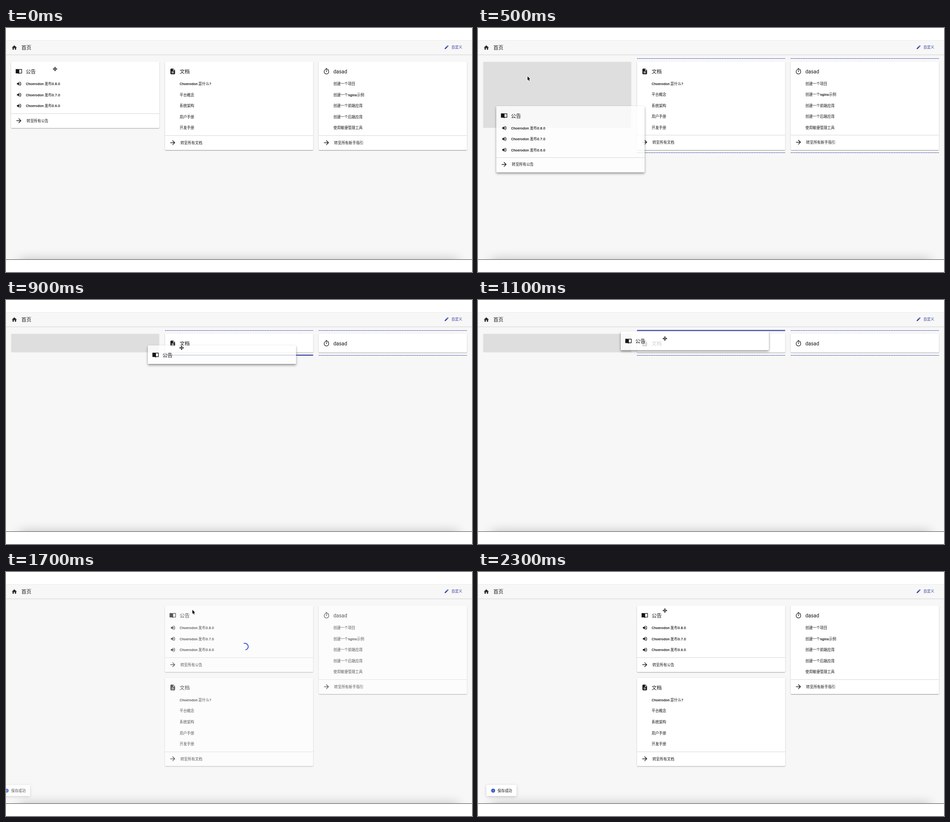
Write an HTML page with a canvas that moves like this. It is 950 by 500 pixels and loops after 2400 ms.

```html
<!DOCTYPE html>
<html lang="zh-CN">
<head>
<meta charset="utf-8">
<style>
html, body { margin: 0; width: 950px; height: 500px; overflow: hidden; background: #fff; }
canvas { display: block; width: 950px; height: 500px; }
</style>
</head>
<body>
<canvas id="stage"></canvas>
<script>
const stage = document.getElementById('stage');
const ctx = stage.getContext('2d');
const dpr = window.devicePixelRatio || 1;
stage.width = 950 * dpr;
stage.height = 500 * dpr;

const FONT = 'Roboto, "Noto Sans CJK SC", "Noto Sans CJK", sans-serif';
const INK = '#141414', NAVY = '#303f9f';
const LOOP = 2400, STEP = 100;
const CARD_W = 302, FOLDED = 38, TOP = 69.3;
const COLS = [10.5, 324.2, 637.6];

const ICONS = {
  home: 'M10 20v-6h4v6h5v-8h3L12 3 2 12h3v8z',
  book: 'M1 4H11L12 5 13 4H23V19H14L12 21 10 19H1zM13.5 6V17H21V6z',
  doc: 'M14 2H6L4 4V20L6 22H18L20 20V8zM8 16H16V18H8zM8 12H16V14H8zM13 9V3.5L18.5 9z',
  sound: 'M3 9v6h4l5 5V4L7 9zM14 8v8a4.5 4.5 0 0 0 0-8M14 3.2v2a7 7 0 0 1 0 13.5v2a9 9 0 0 0 0-17.5z',
  arrow: 'M12 4l-1.4 1.4L16.2 11H4v2h12.2l-5.6 5.6L12 20l8-8z',
  pencil: 'M3 17.2V21h3.8L17.8 9.9 14 6.2zM20.7 7V5.6L18.4 3.3H17L15.1 5.1 18.9 8.9z',
  timer: 'M20 13A8 8 0 1 1 4 13A8 8 0 1 1 20 13M9 2H15M12 8V14M18 7L19.7 5.3'
};
for (const k in ICONS) ICONS[k] = new Path2D(ICONS[k]);

const NEWS = {
  icon: 'book', title: '公告', more: '转至所有公告', bullet: true,
  rows: ['0.8.0', '0.7.0', '0.6.0'].map(v => 'Choerodon 发布' + v)
};
const DOCS = {
  icon: 'doc', title: '文档', more: '转至所有文档',
  rows: ['Choerodon 是什么?', '平台概念', '系统架构', '用户手册', '开发手册']
};
const GUIDE = {
  icon: 'timer', title: 'dasad', more: '转至所有新手指引',
  rows: ['创建一个项目', '创建一个nginx示例', '创建一个前端应用', '创建一个后端应用', '使用敏捷管理工具']
};

// step, card x, card y, pointer x, pointer y
const DRAG = [
  [5, 37.5, 160, 101, 99],
  [6, 76, 121, 150, 128],
  [7, 129.3, 120.7, 218, 132],
  [9, 289.2, 93, 358, 98],
  [10, 297, 74, 378, 86],
  [11, 291, 64.5, 381, 79],
  [12, 291, 64.5, 381, 79]
];

function dragAt(step) {
  let i = 0;
  while (i < DRAG.length - 2 && DRAG[i + 1][0] <= step) i++;
  const a = DRAG[i], b = DRAG[i + 1];
  const k = (step - a[0]) / (b[0] - a[0]);
  return a.map((v, j) => v + (b[j] - v) * k);
}

const fullHeight = card => 67.6 + 22.6 * card.rows.length;

function text(str, x, y, size, weight = 400, color = INK) {
  ctx.font = `${weight} ${size}px ${FONT}`;
  ctx.fillStyle = color;
  ctx.fillText(str, x, y + size * 0.37);
}

function icon(name, cx, cy, size, color = INK) {
  ctx.save();
  ctx.translate(cx - size / 2, cy - size / 2);
  ctx.scale(size / 24, size / 24);
  if (name === 'timer') {
    ctx.strokeStyle = color;
    ctx.lineWidth = 2;
    ctx.stroke(ICONS.timer);
  } else {
    ctx.fillStyle = color;
    ctx.fill(ICONS[name], 'evenodd');
  }
  ctx.restore();
}

// White panel; its shadow is kept outside so the fill may be translucent
function panel(x, y, w, h, fill, shadows) {
  const box = new Path2D();
  box.roundRect(x, y, w, h, 1.5);
  const outside = new Path2D();
  outside.rect(0, 0, 950, 500);
  outside.addPath(box);
  ctx.save();
  ctx.clip(outside, 'evenodd');
  ctx.fillStyle = '#fff';
  for (const [dy, blur, alpha] of shadows) {
    ctx.shadowColor = `rgba(0,0,0,${alpha})`;
    ctx.shadowOffsetY = dy * dpr;
    ctx.shadowBlur = blur * dpr;
    ctx.fill(box);
  }
  ctx.restore();
  ctx.fillStyle = fill;
  ctx.fill(box);
}

function drawCard(card, x, y, opt = {}) {
  const { folded, empty, lifted, squeeze = 0, alpha = 1 } = opt;
  const h = folded ? FOLDED : fullHeight(card);
  ctx.save();
  ctx.globalAlpha = alpha;
  panel(x, y, CARD_W, h, lifted ? 'rgba(255,255,255,.8)' : '#fff',
    lifted ? [[3, 5, .32], [1, 3, .22]] : [[1, 1.5, .3], [.6, 2, .2]]);
  icon(card.icon, x + 15.7, y + 19.7, 14);
  text(card.title, x + 29.8, y + 19.9, 10.29);
  if (!folded && !empty) {
    card.rows.forEach((row, i) => {
      const ry = y + 45 + i * (22.6 - squeeze * .2);
      if (card.bullet) icon('sound', x + 16.2, ry, 11.5);
      text(row, x + 29.9, ry, 7.43, 500);
    });
    ctx.fillStyle = '#d9d9d9';
    ctx.fillRect(x, Math.round(y + h - 29.8 - squeeze), CARD_W, 1);
    const fy = y + h - 14.8 - squeeze;
    icon('arrow', x + 15.7, fy, 15);
    text(card.more, x + 31.5, fy, 7.43, 500);
  }
  ctx.restore();
}

function dropLine(x, y, active) {
  ctx.save();
  ctx.strokeStyle = NAVY;
  ctx.lineWidth = active ? 2 : 1;
  if (!active) ctx.setLineDash([2.3, 1.15]);
  ctx.beginPath();
  ctx.moveTo(x, y);
  ctx.lineTo(x + CARD_W, y);
  ctx.stroke();
  ctx.restore();
}

function arrowPointer(x, y) {
  ctx.save();
  ctx.translate(x, y);
  ctx.beginPath();
  [[0, 0], [0, 8], [1.8, 6.5], [3, 9.4], [4.3, 8.8], [3.1, 6], [5.4, 5.8]]
    .forEach(p => ctx.lineTo(...p));
  ctx.closePath();
  ctx.strokeStyle = '#fff';
  ctx.lineWidth = 1.4;
  ctx.stroke();
  ctx.fillStyle = '#000';
  ctx.fill();
  ctx.restore();
}

function movePointer(x, y) {
  ctx.save();
  ctx.translate(x, y);
  ctx.beginPath();
  for (let i = 0; i < 4; i++) {
    ctx.rotate(Math.PI / 2);
    ctx.moveTo(0, -4.6);
    [[2, -2.5], [.6, -2.5], [.6, 0], [-.6, 0], [-.6, -2.5], [-2, -2.5]]
      .forEach(p => ctx.lineTo(...p));
    ctx.closePath();
  }
  ctx.strokeStyle = '#fff';
  ctx.lineWidth = 1.4;
  ctx.stroke();
  ctx.fillStyle = '#000';
  ctx.fill();
  ctx.restore();
}

function drawPage() {
  ctx.fillStyle = '#fff';
  ctx.fillRect(0, 0, 950, 500);
  ctx.fillStyle = '#f7f7f7';
  ctx.fillRect(0, 25, 950, 449);
  ctx.fillStyle = '#ececec';
  ctx.fillRect(0, 25, 950, 1);
  ctx.fillStyle = '#d4d4d4';
  ctx.fillRect(0, 54.5, 950, 1);
  icon('home', 17, 40.3, 12.6, '#2b2b2b');
  text('首页', 31.3, 40, 10.29, 400, '#222');
  icon('pencil', 898.2, 39.4, 10.5, NAVY);
  text('自定义', 908, 39.3, 7.43, 500, NAVY);

  ctx.save();
  ctx.beginPath();
  ctx.rect(0, 440, 950, 34);
  ctx.clip();
  ctx.shadowColor = 'rgba(0,0,0,.22)';
  ctx.shadowBlur = 22 * dpr;
  ctx.fillStyle = '#fff';
  ctx.fillRect(28, 474, 894, 26);
  ctx.restore();
  ctx.fillStyle = '#555';
  ctx.fillRect(0, 474, 950, 1);
}

function drawToast(step) {
  const k = Math.min(1, (step - 15) / 3);
  const x = 17.3 - 88 * (1 - k) ;
  ctx.save();
  ctx.globalAlpha = k < 1 ? .2 + .8 * k : 1;
  panel(x, 436.5, 61, 22.5, '#fff', [[1.5, 6, .2]]);
  ctx.fillStyle = '#2f50c8';
  ctx.beginPath();
  ctx.arc(x + 13.6, 448, 3.9, 0, 7);
  ctx.fill();
  ctx.fillStyle = '#fff';
  ctx.fillRect(x + 13.2, 447.3, .9, 2.7);
  ctx.fillRect(x + 13.2, 445.8, .9, .9);
  text('保存成功', x + 22.5, 448, 7.43, 500);
  ctx.restore();
}

function drawSpinner(step) {
  const a = -1.95 + (step - 17) * STEP / 1000 * Math.PI * 2;
  ctx.strokeStyle = '#3150d0';
  ctx.lineWidth = 1.7;
  ctx.beginPath();
  ctx.arc(487, 152.9, 6.8, a, a + 3.35);
  ctx.stroke();
}

function drawIdle() {
  [NEWS, DOCS, GUIDE].forEach((c, i) => drawCard(c, COLS[i], TOP));
  movePointer(100, 84);
}

function drawDragging(step) {
  const [, cx, cy, px, py] = dragAt(step);
  const folded = step > 5;
  const look = { folded, squeeze: folded ? 0 : 1 };
  ctx.fillStyle = '#dedede';
  ctx.fillRect(COLS[0], TOP, CARD_W, folded ? FOLDED : fullHeight(NEWS));
  [DOCS, GUIDE].forEach((card, i) => {
    const x = COLS[i + 1];
    const bottom = folded ? 113.5 : 255.5;
    drawCard(card, x, TOP, look);
    dropLine(x, 62.5, i === 0 && step >= 10);
    const under = i === 0 && step === 9;
    dropLine(x, under ? 113 : bottom, under);
  });
  drawCard(NEWS, cx, cy, { ...look, lifted: true });
  (step < 8 ? arrowPointer : movePointer)(px, py);
}

function drawDropped(step) {
  const alpha = Math.min(1, .7 + Math.max(0, step - 18) * .1);
  drawCard(NEWS, COLS[1], TOP, { alpha });
  drawCard(DOCS, COLS[1], 217, { alpha });
  drawCard(GUIDE, COLS[2], TOP, { alpha, empty: step < 15 });
  if (step >= 14 && step < 19) drawSpinner(step);
  if (step >= 16) drawToast(step);
  if (step >= 14 && step < 19) arrowPointer(380, 77.5);
  else movePointer(381, 79);
}

function frame(now) {
  const step = Math.floor(now % LOOP / STEP);
  ctx.setTransform(dpr, 0, 0, dpr, 0, 0);
  drawPage();
  if (step < 5) drawIdle();
  else if (step < 13) drawDragging(step);
  else drawDropped(step);
}

const start = performance.now();
function tick() {
  frame(performance.now() - start);
  requestAnimationFrame(tick);
}
tick();
</script>
</body>
</html>
```
